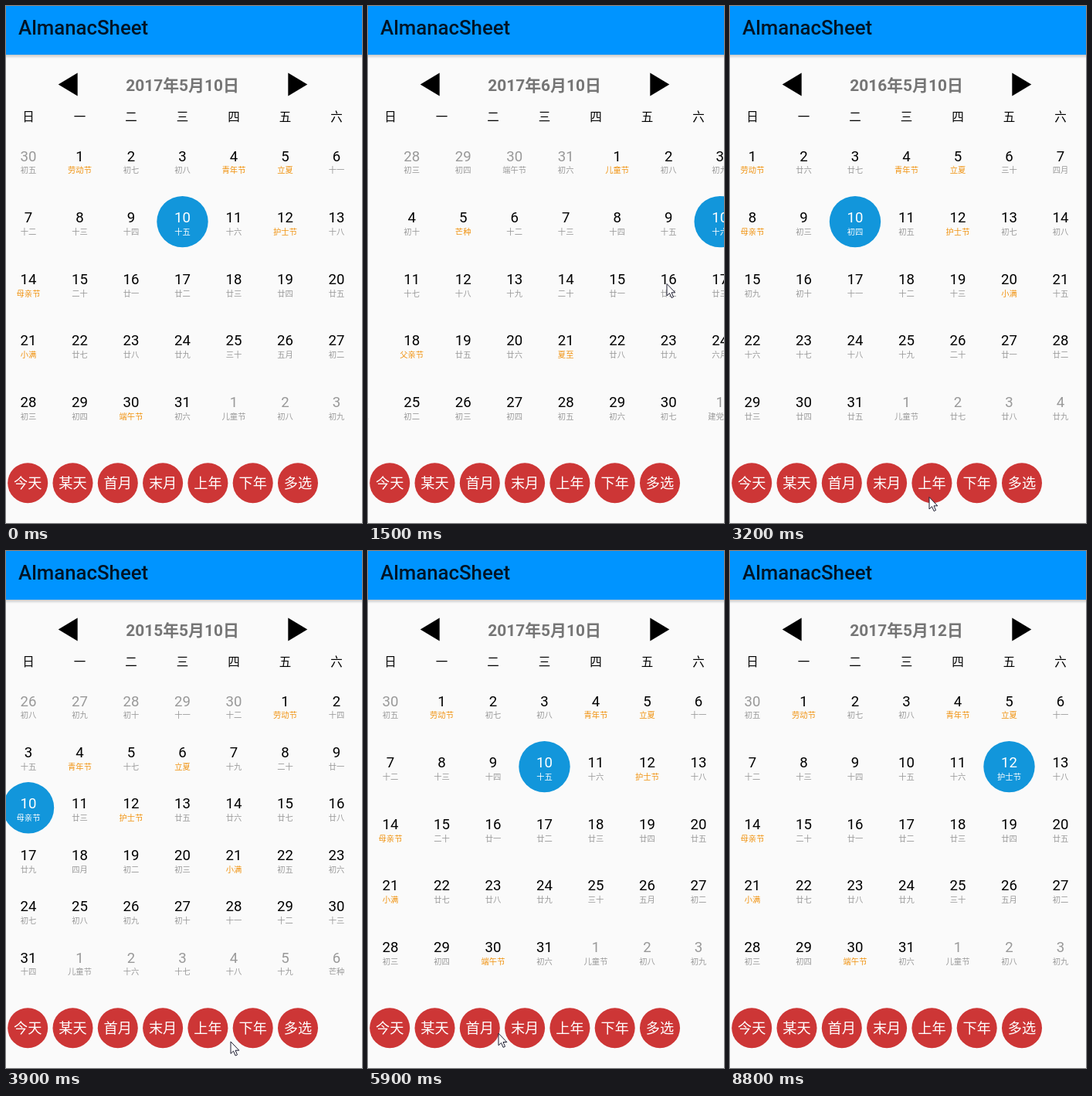
Recreate the animation shown at these times as an HTML page with a canvas. Size 461 by 669 pixels, loop 9700 ms.

```html
<!DOCTYPE html>
<html lang="zh-CN">
<head>
<meta charset="utf-8">
<style>
html, body { margin: 0; height: 100%; overflow: hidden; background: #fafafa; }
canvas { display: block; }
</style>
</head>
<body>
<canvas id="stage" width="461" height="669"></canvas>
<script>
const ctx = document.getElementById('stage').getContext('2d');
const LOOP = 9700, STEP = 100, PAGE = 465.5, COL = 66.5, LEFT = 29, TOP = 199.5;
const FONT = 'Roboto, "Noto Sans CJK SC", "Noto Sans CJK", sans-serif';
const DIGITS = '一二三四五六七八九十';

const festivals = {
  '1/1': '元旦', '5/1': '劳动节', '5/4': '青年节', '5/12': '护士节', '6/1': '儿童节',
  '7/1': '建党节', '12/24': '平安夜', '12/25': '圣诞节'
};
const lunarFestivals = { '1/1': '春节', '5/5': '端午节', '12/30': '除夕' };
// Month and base day of each solar term
const terms = {
  小寒: [1, 5.41], 大寒: [1, 20.12], 立夏: [5, 5.52], 小满: [5, 21.04],
  芒种: [6, 5.68], 夏至: [6, 21.37], 大雪: [12, 7.1], 冬至: [12, 21.94]
};
const lunarFormat = new Intl.DateTimeFormat('en-u-ca-chinese', { month: 'numeric', day: 'numeric' });

function lunarDate(date) {
  const parts = lunarFormat.formatToParts(date);
  return ['month', 'day'].map(type => parseInt(parts.find(p => p.type === type).value));
}

function lunarName(m, d) {
  if (d === 1) return '正二三四五六七八九十冬腊'[m - 1] + '月';
  if (d === 20 || d === 30) return DIGITS[d / 10 - 1] + '十';
  return '初十廿'[Math.floor((d - 1) / 10)] + DIGITS[(d - 1) % 10];
}

function solarTerm(y, m, d) {
  const n = y - 2000, leaps = Math.floor((m < 3 ? n - 1 : n) / 4);
  return Object.keys(terms).find(name =>
    terms[name][0] === m && Math.floor(n * .2422 + terms[name][1]) - leaps === d);
}

function makeCell(date, month) {
  const y = date.getFullYear(), m = date.getMonth() + 1, d = date.getDate();
  const [lm, ld] = lunarDate(date), week = date.getDay() === 0 && Math.ceil(d / 7);
  const sunday = m === 5 && week === 2 ? '母亲节' : m === 6 && week === 3 ? '父亲节' : '';
  const mark = festivals[`${m}/${d}`] || lunarFestivals[`${lm}/${ld}`] || sunday || solarTerm(y, m, d);
  return { day: d, inside: m === month, mark, label: mark || lunarName(lm, ld) };
}

function makeMonth(y, m) {
  const lead = new Date(y, m - 1, 1).getDay();
  const rows = Math.ceil((lead + new Date(y, m, 0).getDate()) / 7);
  const cells = Array.from({ length: rows * 7 }, (_, i) => makeCell(new Date(y, m - 1, 1 - lead + i, 12), m));
  return { y, m, cells, pitch: rows === 5 ? 79.6 : 66.4 };
}

const may = makeMonth(2017, 5), june = makeMonth(2017, 6), may16 = makeMonth(2016, 5);
const shown = [
  [0, may], [600, june], [1700, may], [3000, may16], [3700, makeMonth(2015, 5)], [4600, may16],
  [5200, may], [6200, makeMonth(1990, 1)], [7100, makeMonth(2020, 12)], [8400, may]
];

// Pointer legs: start, end, x, y
const legs = [
  [100, 600, 130, 370], [1000, 1500, 387, 359], [1500, 2000, 338, 443], [2000, 2100, 282, 466],
  [2100, 2400, 256, 650], [2500, 2700, 258, 635], [3600, 4100, 313, 634], [5300, 6000, 145, 622],
  [6200, 6500, 202, 622], [7300, 7800, 27, 631], [8400, 8700, 58, 655]
];

const progress = (t, from, to) => Math.min(1, Math.max(0, (t - from) / (to - from)));
const ease = f => f < .5 ? 4 * f ** 3 : 1 - 4 * (1 - f) ** 3;

function text(str, x, y, size, color, weight = 400, align = 'center') {
  ctx.font = `${weight} ${size}px ${FONT}`;
  ctx.textAlign = align;
  ctx.fillStyle = color;
  ctx.fillText(str, x, y);
}

function disc(x, y, r, color) {
  ctx.fillStyle = color;
  ctx.beginPath();
  ctx.arc(x, y, r, 0, 7);
  ctx.fill();
}

function polygon(points, color) {
  ctx.fillStyle = color;
  ctx.beginPath();
  points.forEach(p => ctx.lineTo(...p));
  ctx.closePath();
  ctx.fill();
}

function drawMonth({ cells, pitch }, dx, selected) {
  cells.forEach(({ day, inside, mark, label }, i) => {
    const active = inside && day === selected;
    const x = LEFT + i % 7 * COL + dx, y = TOP + Math.floor(i / 7) * pitch;
    if (active) disc(x, y, 33.2, '#1296db');
    text(day, x, y + 1, 18.6, active ? '#fff' : inside ? '#000' : '#999');
    text(label, x, y + 16.8, 10.3, active ? '#fff' : mark && inside ? '#f0920f' : '#999');
  });
}

function drawPointer(t) {
  const [x, y] = legs.reduce(([px, py], [from, to, lx, ly]) => {
    const f = progress(t, from, to);
    return [px + (lx - px) * f, py + (ly - py) * f];
  }, [385, 375]);
  ctx.save();
  ctx.translate(x, y);
  polygon([[0, .5], [0, 16], [3.5, 12.7], [6.1, 18.6], [8.5, 17.5], [6, 11.8], [10.8, 11.8]], '#fff');
  ctx.strokeStyle = '#1c1c30';
  ctx.stroke();
  ctx.restore();
}

function draw(t) {
  ctx.fillStyle = '#fafafa';
  ctx.fillRect(0, 0, 461, 669);

  const [, page] = shown.findLast(s => s[0] <= t);
  const day = t < 8400 ? 10 : 12;
  const pos = ease(progress(t, 0, 900)) - ease(progress(t, 1337, 2000));
  if (pos > 0) {
    drawMonth(may, -pos * PAGE, day);
    drawMonth(june, (1 - pos) * PAGE, t >= 600 ? day : 0);
  } else drawMonth(page, 0, day);

  const shade = ctx.createLinearGradient(0, 63, 0, 68);
  shade.addColorStop(0, 'rgba(0,0,0,.2)');
  shade.addColorStop(1, 'rgba(0,0,0,0)');
  ctx.fillStyle = shade;
  ctx.fillRect(0, 63, 461, 5);
  ctx.fillStyle = '#0094ff';
  ctx.fillRect(0, 0, 461, 63);
  text('AlmanacSheet', 16, 37, 25.8, '#021426', 500, 'left');

  for (const side of [-1, 1]) {
    const base = 229 + side * 136.3;
    polygon([[base + side * 25, 101.5], [base, 86.5], [base, 116.5]], '#000');
  }
  text(`${page.y}年${page.m}月${day}日`, 228.5, 109.5, 20.9, '#757575', 700);
  [...'日一二三四五六'].forEach((d, i) => text(d, LEFT + i * COL, 149.3, 15.5, '#000'));
  ['今天', '某天', '首月', '末月', '上年', '下年', '多选'].forEach((label, i) => {
    const x = 28.2 + i * 58.3;
    disc(x, 617.2, 26, '#cd3636');
    text(label, x, 624.4, 18.2, '#fff');
  });

  if (t >= 100 && t < 8800) drawPointer(t);
}

function frame() {
  draw(Math.floor(performance.now() % LOOP / STEP) * STEP);
  requestAnimationFrame(frame);
}
frame();
</script>
</body>
</html>
```
